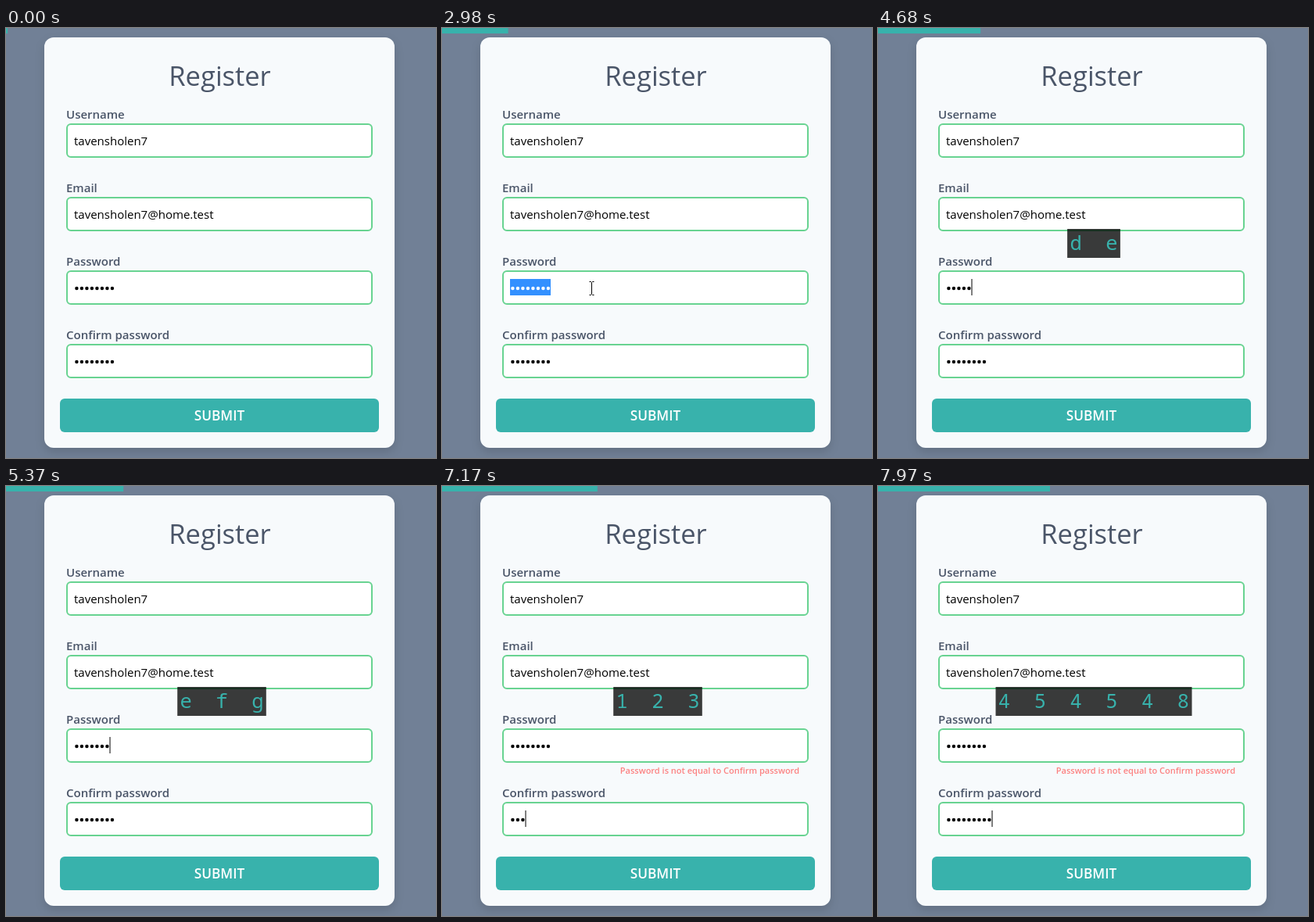
Recreate the animation shown at these times as an HTML page. Size 550 by 550 pixels, loop 8000 ms.

```html
<!DOCTYPE html>
<html lang="en">
<head>
<meta charset="utf-8">
<title>Register</title>
<style>
  html, body { margin: 0; height: 100%; overflow: hidden; background: #718096; }
  svg { display: block; width: 100vw; height: 100vh; font-family: "Open Sans", "Noto Sans", sans-serif; }
  .card { fill: #f7fafc; filter: drop-shadow(0 5px 6px rgba(0, 0, 0, .13)); }
  .title { font-size: 34.5px; font-weight: 500; fill: #4a5568; }
  .label { font-size: 15px; font-weight: 600; fill: #4a5568; }
  .box { fill: #fff; stroke: #68d391; stroke-width: 2; }
  .value { font-size: 15px; fill: #000; }
  .submit { font-size: 17.2px; font-weight: 600; fill: #fff; }
  .error { font-size: 11px; font-weight: 600; fill: #fc8181; }
  .key { font: 25.5px "Noto Sans Mono", "DejaVu Sans Mono", monospace; fill: #38b2ac; }
  .middle { text-anchor: middle; }
</style>
</head>
<body>
<svg viewBox="0 0 550 550">
  <rect width="550" height="550" fill="#718096"/>
  <rect class="card" x="49" y="12" width="448" height="525" rx="12"/>
  <text class="title middle" x="273.5" y="74">Register</text>
  <g id="fields"></g>
  <rect x="69" y="474" width="408" height="43" rx="6" fill="#38b2ac"/>
  <text class="submit middle" x="273" y="502">SUBMIT</text>
  <g id="live"></g>
</svg>
<script>
const LOOP = 8000;
const KEY_LIFE = 1000;
const SELECT_AT = 2350;   // password selected by mouse
const TAB_AT = 5800;      // focus moves to the confirmation
const PASSWORD_Y = 333, CONFIRM_Y = 427;

const typing = (text, times) => [...text].map((char, i) => ({ char, at: times[i] }));
const passwordKeys = typing('abcdefgh', [3150, 3450, 3600, 3800, 4500, 4850, 5200, 5500]);
const confirmKeys = typing('123454548', [6500, 6680, 6950, 7200, 7340, 7440, 7600, 7662, 7800]);
const allKeys = [...passwordKeys, ...confirmKeys];

// Pointer stops: time, x, y
const pointerPath = [
  [520, 165, 383], [900, 165, 383], [1180, 204, 358], [1420, 203, 306],
  [1700, 185, 334], [2000, 185, 334], [2250, 191, 333], [3150, 191, 333]
];

const values = ['tavensholen7', 'tavensholen7@home.test', '', ''];
document.getElementById('fields').innerHTML =
  ['Username', 'Email', 'Password', 'Confirm password'].map((label, i) => `
    <g transform="translate(0 ${94 * i})">
      <text class="label" x="77" y="116">${label}</text>
      <rect class="box" x="78" y="123" width="390" height="42" rx="5"/>
      <text class="value" x="87" y="150">${values[i]}</text>
    </g>`).join('');

const rect = (x, y, w, h, fill) =>
  `<rect x="${x}" y="${y}" width="${w}" height="${h}" fill="${fill}"/>`;

function progressBar(t) {
  const step = Math.min(103, Math.floor(t / 76.9 + .4));
  return rect(0, 0, (step + 1) * 550 / 260, 7, '#38b2ac');
}

function secret(t, keys, y, selectAt, blurAt) {
  const typed = keys.filter(key => key.at <= t);
  const count = typed.length || 8;
  const selected = !typed.length && t >= selectAt;
  let out = selected ? rect(87, y - 12, 52, 21, '#3390ff') : '';
  for (let i = 0; i < count; i++)
    out += `<circle cx="${90.4 + 6.5 * i}" cy="${y}" r="2.2" fill="${selected ? '#fff' : '#000'}"/>`;
  if (typed.length && t < blurAt) {
    const idle = t - typed[typed.length - 1].at;
    if (idle % 1060 < 530) out += rect(87 + 6.5 * count, y - 12, 1, 21, '#000');
  }
  return out;
}

function keyPanel(t) {
  const shown = allKeys.filter(key => key.at <= t && t < key.at + KEY_LIFE);
  if (!shown.length) return '';
  const pitch = 45.8, width = 22 + pitch * (shown.length - 1), left = 276 - width / 2;
  return rect(left, 257, width, 37, 'rgba(0,0,0,.77)') + shown.map((key, i) =>
    `<text class="key middle" x="${left + 11 + pitch * i}" y="284">${key.char}</text>`).join('');
}

function pointer(t) {
  const next = pointerPath.findIndex(stop => stop[0] > t);
  if (next < 1) return '';
  const [t0, x0, y0] = pointerPath[next - 1], [t1, x1, y1] = pointerPath[next];
  const p = (t - t0) / (t1 - t0), ease = p * p * (3 - 2 * p);
  const x = x0 + (x1 - x0) * ease, y = y0 + (y1 - y0) * ease;
  const shape = y > 310 && y < 354
    ? '<path d="M-3-8.5H-1L0-7.5 1-8.5H3M0-7.5V7.5M-3 8.5H-1L0 7.5 1 8.5H3" fill="none" stroke="#000"/>'
    : '<path d="M0 0V16L4 12.5 6.5 18.5 9 17.5 6.5 11.5H11.5Z" fill="#fff" stroke="#000"/>';
  return `<g transform="translate(${Math.round(x) + .5} ${Math.round(y)})">${shape}</g>`;
}

const live = document.getElementById('live');
function draw() {
  const t = performance.now() % LOOP;
  live.innerHTML = progressBar(t)
    + secret(t, passwordKeys, PASSWORD_Y, SELECT_AT, TAB_AT)
    + secret(t, confirmKeys, CONFIRM_Y, TAB_AT, LOOP)
    + (t >= TAB_AT
      ? '<text class="error" x="457" y="368" text-anchor="end">Password is not equal to Confirm password</text>' : '')
    + keyPanel(t) + pointer(t);
  requestAnimationFrame(draw);
}
draw();
</script>
</body>
</html>
```
